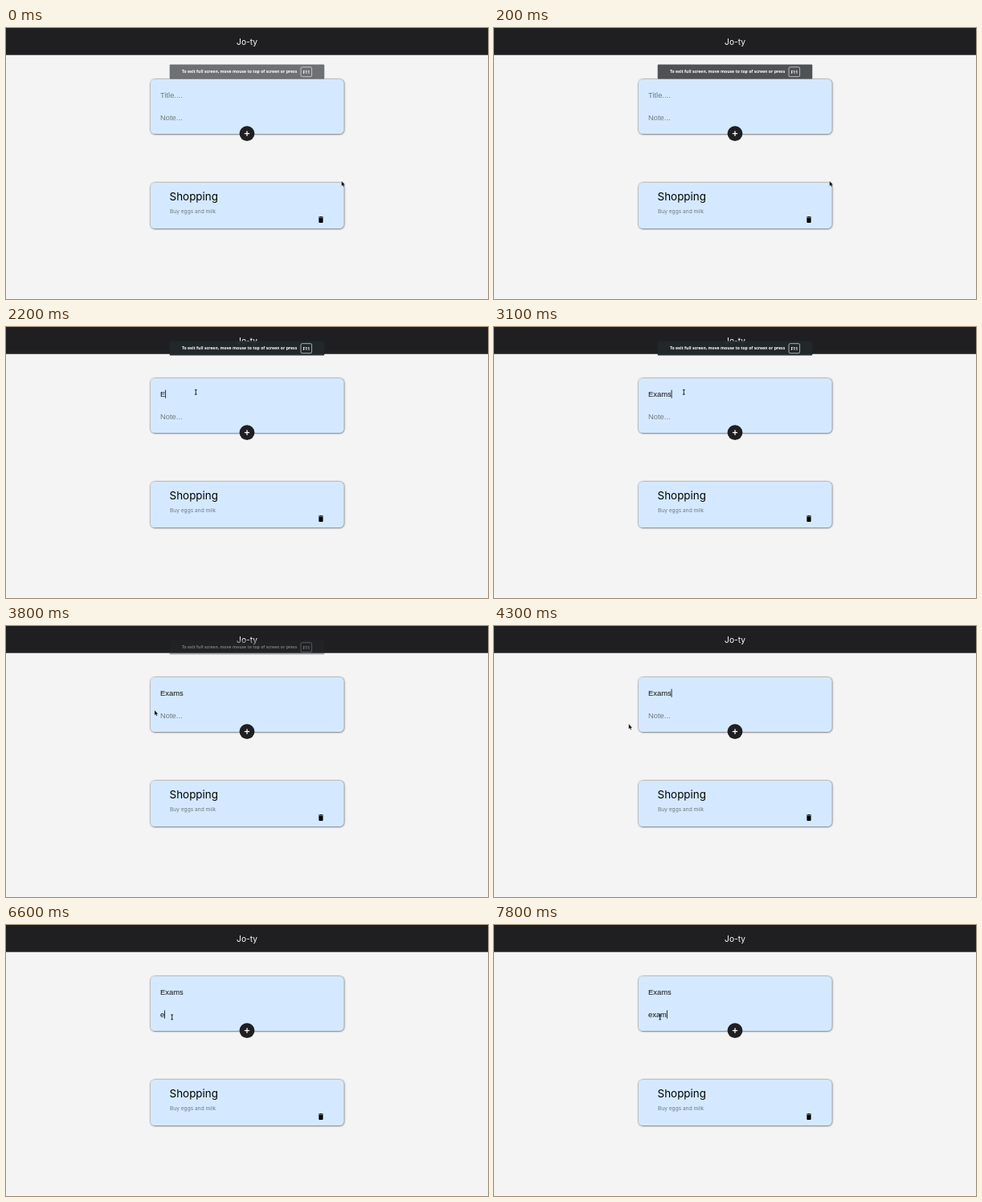
Animation, 600 px wide and 338 px high, one loop 8 s. Source, as an HTML page:

```html
<!DOCTYPE html>
<html lang="en">
<head>
<meta charset="utf-8">
<title>Notes</title>
<style>
  html, body { margin: 0; width: 100%; height: 100%; overflow: hidden; background: #f4f4f5; }
  svg { display: block; width: 100vw; height: 100vh; }
  .ui { font-family: Inter, "Open Sans", sans-serif; }
  .field { font: 9.4px "Liberation Sans", Arial, sans-serif; }
  .hint { font: 700 5.13px "Open Sans", "Noto Sans", sans-serif; fill: #fff; }
  .card { fill: #d4e9ff; filter: url(#shadow); }
</style>
</head>
<body>
<svg viewBox="0 0 600 338">
  <defs>
    <filter id="shadow" x="-5%" y="-15%" width="110%" height="130%">
      <feDropShadow dx="0.3" dy="0.3" stdDeviation="1.3" flood-color="#000" flood-opacity="0.85"/>
    </filter>
  </defs>
  <rect width="600" height="338" fill="#f4f4f5"/>
  <rect width="600" height="33.7" fill="#1f1f21"/>
  <text class="ui" x="300" y="20.6" font-size="10.2" fill="#fff" text-anchor="middle">Jo-ty</text>

  <rect class="card" x="180" y="64" width="240.4" height="68" rx="5.5"/>
  <text class="field" id="title" x="192" y="87.2"></text>
  <text class="field" id="note" x="192" y="115.1"></text>
  <rect id="caret" width="0.8" height="10.3"/>
  <circle cx="300" cy="131.6" r="9.4" fill="#1f1f21"/>
  <path d="M296.9 131.6h6.2M300 128.5v6.2" stroke="#fff" stroke-width="1.3"/>

  <rect class="card" x="180" y="193" width="240.4" height="57" rx="5.5"/>
  <text class="ui" x="203.6" y="214.9" font-size="13.4">Shopping</text>
  <text class="ui" x="204" y="231.4" font-size="6.6" fill="#70787f">Buy eggs and milk</text>
  <path d="M389 235.5h1.6l.5-.6h1.8l.5.6h1.6v1.1h-6zM389.4 237h5.2v5a.9.9 0 0 1-.9.9h-3.4a.9.9 0 0 1-.9-.9z"/>

  <g id="banner">
    <rect id="plate" x="203.7" y="45.5" width="192.6" height="18" rx="1" fill="#23282b"/>
    <text class="hint" x="219" y="56.4">To exit full screen, move mouse to top of screen or press</text>
    <rect x="367" y="48.7" width="13.6" height="12" rx="1.6" fill="none" stroke="#e4e5e6" stroke-width="0.7"/>
    <text class="hint" x="373.8" y="56.5" text-anchor="middle">F11</text>
  </g>

  <path id="arrow" d="M0 0v6.2l1.4-1.2 1 2.2 1.1-.5-1-2.1h1.9z" stroke="#fff" stroke-width="0.25"/>
  <path id="beam" d="M-1.4-2.9h2.8M0-2.9v5.8M-1.4 2.9h2.8" stroke="#111" stroke-width="0.9"/>
</svg>
<script>
const LOOP = 8000, STEP = 100;
const $ = id => document.getElementById(id);
const [title, note, caret, banner, plate, arrow, beam] =
  ["title", "note", "caret", "banner", "plate", "arrow", "beam"].map($);

const hints = { title: "Title....", note: "Note..." };

// [time, focused field, its value]
const keys = [
  [1000, "title", ""], [1800, "title", "E"], [2300, "title", "Ex"], [2800, "title", "Exa"],
  [2900, "title", "Exam"], [3100, "title", "Exams"],
  [4800, "note", ""], [5400, "note", "e"], [5600, "note", "ex"], [5800, "note", "exa"],
  [6000, "note", "exams"], [6300, "note", "exam"], [6400, "note", "exa"], [6500, "note", "ex"],
  [6600, "note", "e"], [6700, "note", "ex"], [7100, "note", "exa"], [7800, "note", "exam"]
];

// [time, x, y]
const route = [
  [200, 417.7, 191], [1000, 236.3, 81.2], [3500, 236.3, 81.2], [4000, 157, 118],
  [4300, 167.7, 122.3], [4500, 179, 126], [4800, 206.7, 114.9]
];

const clamp = v => Math.min(1, Math.max(0, v));
const smooth = v => v * v * (3 - 2 * v);
const ramp = (t, from, to) => clamp((t - from) / (to - from));

function pointer(t) {
  let [, x, y] = route[0];
  for (let i = 1; i < route.length; i++) {
    const [t0, x0, y0] = route[i - 1], [t1, x1, y1] = route[i];
    if (t < t0) break;
    const k = smooth(ramp(t, t0, t1));
    x = x0 + (x1 - x0) * k;
    y = y0 + (y1 - y0) * k;
  }
  return [x, y];
}

function setField(el, value) {
  el.textContent = value || hints[el.id];
  el.setAttribute("fill", value ? "#111" : "#737a80");
}

function drawForm(t) {
  const values = { title: "", note: "" };
  let last = null;
  for (const key of keys) {
    if (key[0] > t) break;
    last = key;
    values[key[1]] = key[2];
  }
  setField(title, values.title);
  setField(note, values.note);
  const lit = last && (t - last[0]) % 1000 < 500;
  caret.style.display = lit ? "" : "none";
  if (!lit) return;
  const el = $(last[1]);
  caret.setAttribute("x", 192 + (last[2] ? el.getComputedTextLength() : 0));
  caret.setAttribute("y", +el.getAttribute("y") - 8.7);
}

function drawBanner(t) {
  const rise = smooth(ramp(t, 300, 700));
  banner.setAttribute("transform", `translate(0 ${-28 * rise})`);
  plate.setAttribute("opacity", 0.64 + 0.3 * ramp(t, 0, 400));
  banner.setAttribute("opacity", 1 - ramp(t, 3500, 4000));
}

function drawPointer(t) {
  const [x, y] = pointer(t);
  const inField = x > 190 && x < 410 && ((y > 76 && y < 92) || (y > 104 && y < 120));
  for (const [el, shown] of [[arrow, !inField], [beam, inField]]) {
    el.style.display = shown ? "" : "none";
    el.setAttribute("transform", `translate(${x} ${y})`);
  }
}

function draw(t) {
  drawForm(t);
  drawBanner(t);
  drawPointer(t);
}

const start = performance.now();
function tick() {
  const t = (performance.now() - start) % LOOP;
  draw(Math.floor(t / STEP) * STEP);
  requestAnimationFrame(tick);
}
tick();
</script>
</body>
</html>
```
